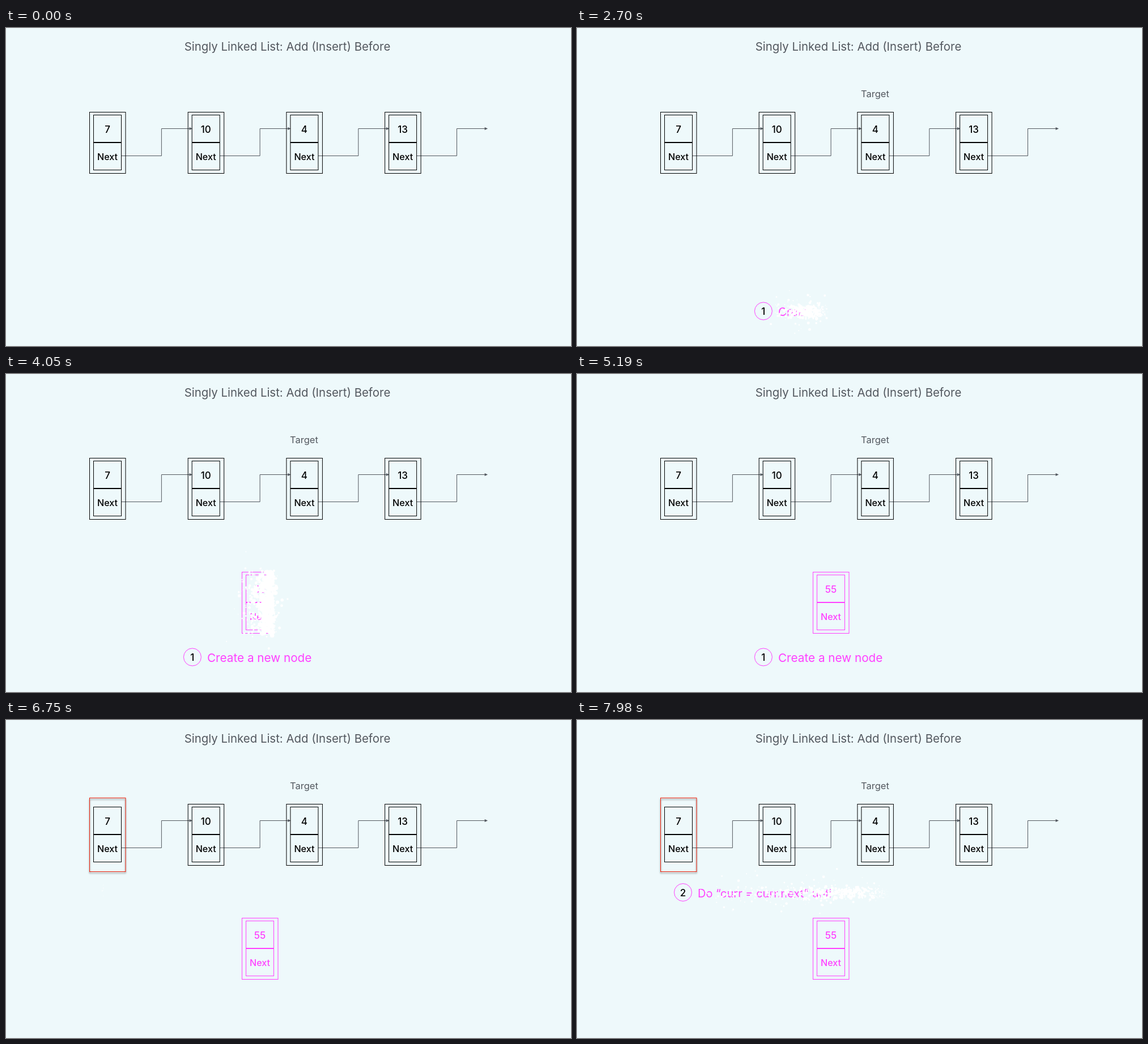
These frames come from a looping animation (997 by 561 pixels, 8000 ms). An HTML page with a canvas:

```html
<!DOCTYPE html>
<html lang="en">
<head>
<meta charset="utf-8">
<title>Singly linked list: insert before</title>
<style>
  html, body { margin: 0; width: 100%; height: 100%; overflow: hidden; background: #eef9fb; }
  canvas { display: block; }
</style>
</head>
<body>
<canvas id="stage" width="997" height="561"></canvas>
<script>
const ctx = document.getElementById('stage').getContext('2d');
const LOOP = 8000;
const GREY = '#53585f', PINK = '#ff40ff', BLACK = '#000';
const NODE_W = 63.5, NODE_H = 108;

const clamp = v => Math.max(0, Math.min(1, v));
const progress = (t, from, to) => clamp((t - from) / (to - from));
const smooth = p => p * p * (3 - 2 * p);

let seed = 7;
function random() {
  seed = (seed + 0x6D2B79F5) | 0;
  let n = Math.imul(seed ^ (seed >>> 15), 1 | seed);
  n = (n + Math.imul(n ^ (n >>> 7), 61 | n)) ^ n;
  return ((n ^ (n >>> 14)) >>> 0) / 4294967296;
}

function text(str, x, y, size, color, align = 'center', weight = 400) {
  ctx.font = `${weight} ${size}px Inter, sans-serif`;
  ctx.textAlign = align;
  ctx.fillStyle = color;
  ctx.fillText(str, x, y);
}

function box(x, y, w, h, color) {
  ctx.strokeStyle = color;
  ctx.lineWidth = 1;
  ctx.strokeRect(x, y, w, h);
}

function node(x, y, value, color, outlined = true) {
  if (outlined) box(x, y, NODE_W, NODE_H, color);
  box(x + 7, y + 5, 49, 97, color);
  ctx.fillStyle = color;
  ctx.fillRect(x + 7, y + 52.5, 49, 2);
  text(value, x + 31.5, y + 36, 17, color, 'center', 450);
  text('Next', x + 31.5, y + 84.7, 16.1, color, 'center', 450);
}

function connector(x) {
  ctx.strokeStyle = ctx.fillStyle = GREY;
  ctx.lineWidth = 1;
  ctx.beginPath();
  ctx.moveTo(x + 56, 225.5);
  ctx.lineTo(x + 126.9, 225.5);
  ctx.lineTo(x + 126.9, 177.5);
  ctx.lineTo(x + 177, 177.5);
  ctx.stroke();
  ctx.beginPath();
  ctx.moveTo(x + 181.5, 177.5);
  ctx.lineTo(x + 176, 175);
  ctx.lineTo(x + 176, 180);
  ctx.fill();
}

function badge(digit, x, y) {
  ctx.strokeStyle = PINK;
  ctx.lineWidth = 1;
  ctx.beginPath();
  ctx.arc(x, y, 15.5, 0, Math.PI * 2);
  ctx.stroke();
  text(digit, x, y + 6.8, 17, BLACK, 'center', 450);
}

// Reveals a drawing from left to right behind a cloud of white sparks.
function sparkle({ start, x, y, w, h, count, size, pace = 1, draw }) {
  const sweep = 450 * pace, lag = 95 * pace;
  const sparks = Array.from({ length: count }, () => {
    const birth = random() * sweep;
    const angle = random() * Math.PI * 2;
    const reach = 4 + 45 * random() ** 8;
    return {
      birth,
      life: (130 + 350 * random() ** 3) * pace,
      x: x + w * birth / sweep,
      y: y + h * random(),
      dx: Math.cos(angle) * reach,
      dy: Math.sin(angle) * reach,
      r: (2 + 3.5 * random()) * size
    };
  });
  return t => {
    const elapsed = t - start;
    if (elapsed < 0) return;
    const shown = (elapsed - lag) / sweep;
    if (shown > 0) {
      ctx.save();
      if (shown < 1) {
        ctx.beginPath();
        ctx.rect(x - 4, y - 18, 4 + w * shown, h + 36);
        ctx.clip();
      }
      draw();
      ctx.restore();
    }
    ctx.fillStyle = '#fff';
    ctx.beginPath();
    for (const s of sparks) {
      const age = elapsed - s.birth, k = age / s.life;
      if (k <= 0 || k >= 1) continue;
      const drift = 1 - (1 - k) ** 2;
      const r = s.r * Math.min(1, age / 60) * Math.sqrt(1 - k);
      const px = s.x + s.dx * drift, py = s.y + s.dy * drift;
      ctx.moveTo(px + r, py);
      ctx.arc(px, py, r, 0, Math.PI * 2);
    }
    ctx.fill();
  };
}

const stepOneBadge = sparkle({
  start: 1530, x: 313, y: 484, w: 32, h: 32, count: 500, size: 0.7, pace: 0.78,
  draw: () => badge('1', 328.9, 499.4)
});
const stepOneText = sparkle({
  start: 2490, x: 356, y: 491, w: 185, h: 18, count: 1000, size: 0.65,
  draw: () => text('Create a new node', 355, 508, 20.7, PINK, 'left', 430)
});
const newNode = sparkle({
  start: 3630, x: 417, y: 349, w: 63, h: 109, count: 1500, size: 1,
  draw: () => node(416.5, 349.5, '55', PINK)
});
const stepTwoBadge = sparkle({
  start: 6735, x: 171, y: 288, w: 32, h: 32, count: 500, size: 0.7, pace: 0.78,
  draw: () => badge('2', 187, 304.1)
});
const stepTwoText = sparkle({
  start: 7680, x: 214, y: 297, w: 510, h: 17, count: 1200, size: 0.65,
  draw: () => text('Do “curr = curr.next” until', 213, 313, 20, PINK, 'left', 430)
});

const values = ['7', '10', '4', '13'];

function highlight(p) {
  ctx.save();
  ctx.shadowColor = `rgba(0, 0, 0, ${0.55 * p})`;
  ctx.shadowOffsetY = 2.5 * p;
  ctx.shadowBlur = 3 * p;
  box(147.5, 148.5 - 11 * p, NODE_W, NODE_H + 22 * p, `rgb(${238 * p}, ${34 * p}, ${12 * p})`);
  ctx.restore();
}

function render(t) {
  ctx.fillStyle = '#eef9fb';
  ctx.fillRect(0, 0, 997, 561);
  text('Singly Linked List: Add (Insert) Before', 496.5, 39.5, 20.4, GREY);

  ctx.globalAlpha = progress(t, 1270, 1530);
  text('Target', 526, 122, 16.5, GREY);
  ctx.globalAlpha = 1;

  values.forEach((value, i) => {
    const x = 147.5 + 173.7 * i;
    connector(x);
    node(x, 148.5, value, BLACK, i > 0);
  });
  highlight(smooth(progress(t, 5250, 6720)));

  newNode(t);
  const fade = 1 - progress(t, 5260, 5600);
  if (fade > 0) {
    ctx.globalAlpha = fade;
    stepOneBadge(t);
    stepOneText(t);
    ctx.globalAlpha = 1;
  }
  stepTwoBadge(t);
  stepTwoText(t);
}

const begin = performance.now();
function tick() {
  render((performance.now() - begin) % LOOP);
  requestAnimationFrame(tick);
}
tick();
</script>
</body>
</html>
```
